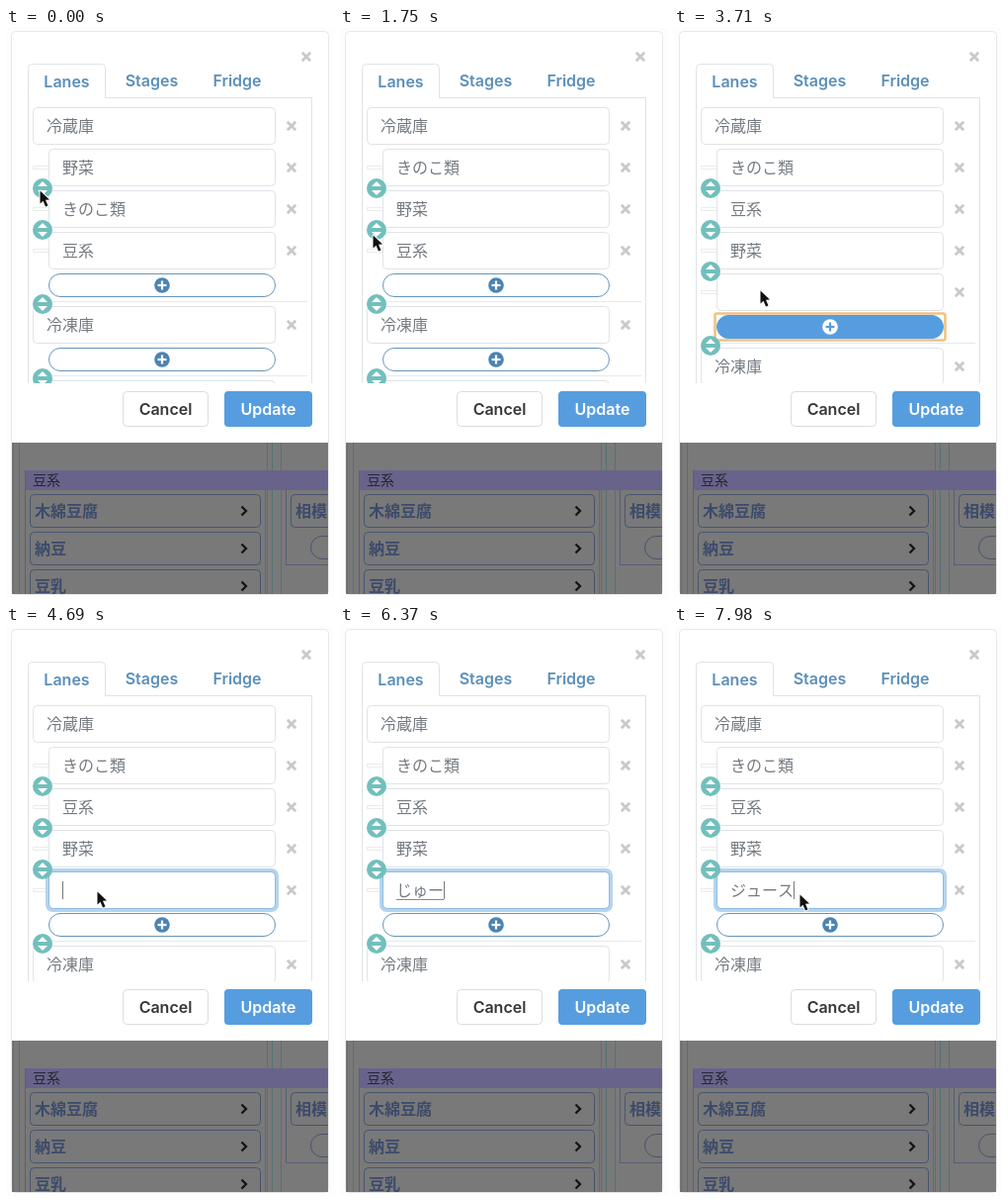
Write an HTML page with a canvas that moves like this. It is 332x576 px and loops after 8050 ms.

```html
<!DOCTYPE html>
<html lang="ja">
<head>
<meta charset="utf-8">
<title>Lane editor</title>
<style>
html, body { margin: 0; width: 100%; height: 100%; overflow: hidden; background: #fff; }
canvas { display: block; width: 332px; height: 576px; }
</style>
</head>
<body>
<canvas id="stage"></canvas>
<script>
const W = 332, H = 576, LOOP = 8050, STEP = 70;
const canvas = document.getElementById('stage');
const c = canvas.getContext('2d');
const ratio = window.devicePixelRatio || 1;
canvas.width = W * ratio;
canvas.height = H * ratio;

const JP = '"Noto Sans CJK JP", "Noto Sans CJK", sans-serif';
const UI = 'Inter, "Noto Sans", sans-serif';
const BLUE = '#569de0', LINK = '#5b8fb9', TEAL = '#72bfbd', RING = '#f1c283';
const BORDER = '#dfe3e7', GREY = '#747a80', NAVY = '#3c4a6a';

// Moments of the recorded actions
const SWAP1 = 840, SWAP2 = 2170, ADD = 3430, FOCUS = 4410, TYPED = 6720;
const typing = [
  [5880, 'j'], [6020, 'じ'], [6160, 'じゅ'], [6300, 'じゅー'],
  [6440, 'じゅーs'], [6510, 'じゅーす'], [TYPED, 'ジュース']
];
const path = [
  [0, 34, 164], [980, 34, 164], [1540, 33, 209], [2240, 33, 209], [2590, 63, 234],
  [3080, 87, 262], [3430, 87, 262], [3640, 87, 265], [3920, 87, 265],
  [4270, 92, 268], [7350, 92, 268], [7840, 127, 271], [LOOP, 127, 271]
];

function box(x, y, w, h, r, stroke, fill, line = 1) {
  c.beginPath();
  c.roundRect(x, y, w, h, r);
  if (fill) { c.fillStyle = fill; c.fill(); }
  if (stroke) { c.strokeStyle = stroke; c.lineWidth = line; c.stroke(); }
}

function poly(points, color, width, close) {
  c.beginPath();
  points.forEach(([x, y], i) => i ? c.lineTo(x, y) : c.moveTo(x, y));
  if (close) c.closePath();
  if (width) { c.strokeStyle = color; c.lineWidth = width; c.stroke(); }
  else { c.fillStyle = color; c.fill(); }
}

const line = (x1, y1, x2, y2, color, width = 1) => poly([[x1, y1], [x2, y2]], color, width);

function disc(x, y, r, color) {
  c.beginPath();
  c.arc(x, y, r, 0, Math.PI * 2);
  c.fillStyle = color;
  c.fill();
}

function text(s, x, y, color, font, align = 'left') {
  c.font = font;
  c.fillStyle = color;
  c.textAlign = align;
  c.fillText(s, x, y);
}

function cross(x, y) {
  line(x - 4.2, y - 4.2, x + 4.2, y + 4.2, '#c6cacd', 2.8);
  line(x - 4.2, y + 4.2, x + 4.2, y - 4.2, '#c6cacd', 2.8);
}

function swapButton(y, ring) {
  disc(37, y, 10, TEAL);
  poly([[32, y - 2], [42, y - 2], [37, y - 7]], '#fff', 0, true);
  poly([[32, y + 2], [42, y + 2], [37, y + 7]], '#fff', 0, true);
  if (ring) box(25.5, y - 11.5, 23, 23, 1, RING, null, 3);
}

function field(x, y, label, focused) {
  if (focused) {
    box(x - 1, y - 1, 275 - x, 40, 5, '#b5d4ee', '#fff', 4);
    box(x + .5, y + .5, 272 - x, 37, 4, '#8dbde6');
  } else {
    box(x + .5, y + .5, 272 - x, 37, 4, BORDER, '#fff');
  }
  text(label, x + 14, y + 25, GREY, '16px ' + JP);
  cross(289, y + 19);
}

function addButton(y, filled, ring) {
  box(43.5, y + .5, 229, 23, 11.5, filled ? BLUE : '#6794bb', filled ? BLUE : '#fff');
  const ink = filled ? '#fff' : '#4b84b3', plus = filled ? BLUE : '#fff';
  disc(158, y + 12, 7.8, ink);
  line(153.5, y + 12, 162.5, y + 12, plus, 2.2);
  line(158, y + 7.5, 158, y + 16.5, plus, 2.2);
  if (ring) box(41.5, y - 1.5, 233, 27, 2, RING, null, 2.6);
}

function card(x, y, w, label) {
  box(x + .5, y + .5, w, 33, 4, '#48546f');
  text(label, x + 5, y + 23, NAVY, 'bold 16px ' + JP);
}

function backdrop() {
  c.save();
  c.beginPath();
  c.rect(6, 419, 320, 153);
  c.clip();
  c.fillStyle = '#797979';
  c.fillRect(6, 419, 320, 153);
  for (const x of [7.5, 13.5, 264.5, 269.5, 278.5]) line(x, 419, x, 572, '#557275');
  line(19.5, 447, 19.5, 572, '#59617a');
  line(262.5, 467, 262.5, 572, '#626878');
  c.fillStyle = '#68638a';
  c.fillRect(20, 447, 244, 20);
  c.fillRect(264, 447, 62, 20);
  text('豆系', 27, 462, '#242530', '14px ' + JP);
  ['木綿豆腐', '納豆', '豆乳'].forEach((name, i) => {
    const y = 471 + i * 38;
    card(24, y, 233, name);
    poly([[238.5, y + 12.5], [243, y + 17], [238.5, y + 21.5]], '#151515', 2.3);
  });
  line(283.5, 467, 283.5, 542, '#555e76');
  line(283, 542.5, 326, 542.5, '#555e76');
  card(288, 471, 80, '相模');
  box(308.5, 513.5, 70, 23, 12, '#48546f');
  c.restore();
}

function frameAndTabs() {
  box(5.5, 3.5, 321, 569, 4, '#e8e8e8', '#fff');
  cross(304, 29);
  line(101, 70.5, 309, 70.5, BORDER);
  line(22.5, 70, 22.5, 359, BORDER);
  line(309.5, 70, 309.5, 359, BORDER);
  c.beginPath();
  c.moveTo(22.5, 71);
  c.arcTo(22.5, 36.5, 40, 36.5, 4);
  c.arcTo(100.5, 36.5, 100.5, 50, 4);
  c.lineTo(100.5, 71);
  c.strokeStyle = BORDER;
  c.lineWidth = 1;
  c.stroke();
  const font = '600 16px ' + UI;
  text('Lanes', 61.5, 60, LINK, font, 'center');
  text('Stages', 147.5, 59, LINK, font, 'center');
  text('Fridge', 234, 59, LINK, font, 'center');
}

function footer() {
  const font = '600 16px ' + UI;
  box(118.5, 367.5, 86, 35, 4, '#dcdcdc', '#fff');
  text('Cancel', 161.5, 391, '#363636', font, 'center');
  box(221, 367, 89, 36, 4, null, BLUE);
  text('Update', 265.5, 391, '#fff', font, 'center');
}

function lanes(t) {
  const names = t < SWAP1 ? ['野菜', 'きのこ類', '豆系']
    : t < SWAP2 ? ['きのこ類', '野菜', '豆系'] : ['きのこ類', '豆系', '野菜'];
  const entry = typing.reduce((s, [at, v]) => t >= at ? v : s, '');
  const added = t >= ADD, focused = t >= FOCUS;
  if (added) names.push(entry);
  const shift = added ? 42 : 0;

  c.save();
  c.beginPath();
  c.rect(20, 72, 288, 287);
  c.clip();
  field(27, 80, '冷蔵庫');
  names.forEach((name, i) => {
    const y = 122 + i * 42;
    box(27.5, y + 17.5, 16, 3, 0, '#e9ebed');
    field(43, y, name, focused && i === 3);
  });

  if (focused) {
    const last = typing.reduce((s, [at]) => t >= at ? at : s, FOCUS + 70);
    const x = 57 + (c.font = '16px ' + JP, c.measureText(entry).width);
    if (entry && t < TYPED) line(57, 276.5, x, 276.5, '#888');
    if ((t - last) % 1000 < 560) line(x + .5, 258, x + .5, 276, '#777');
  }

  const over = t >= 2940 && t < FOCUS - 210;
  const ring = t >= ADD - 140 && t < FOCUS;
  addButton(248 + shift, over, ring);
  line(27, 276.5 + shift, 305, 276.5 + shift, '#e6e8ea');
  field(27, 281 + shift, '冷凍庫');
  addButton(323 + shift);
  line(27, 351.5 + shift, 305, 351.5 + shift, '#e6e8ea');
  field(27, 356 + shift, '');

  const firstRing = (t >= SWAP1 - 140 && t < SWAP1) || (t >= SWAP2 && t < ADD - 140);
  swapButton(162, firstRing);
  swapButton(204, t >= SWAP2 - 140 && t < SWAP2);
  if (added) swapButton(246);
  swapButton(279 + shift);
  swapButton(354 + shift);
  c.restore();
}

function pointer(t) {
  if (t >= 5040 && t < 7350) return;
  const i = path.findIndex(p => p[0] > t);
  const [t0, x0, y0] = path[i - 1], [t1, x1, y1] = path[i];
  const u = (t - t0) / (t1 - t0), e = u * u * (3 - 2 * u);
  c.save();
  c.translate(x0 + (x1 - x0) * e, y0 + (y1 - y0) * e);
  const arrow = [[.5, .5], [.5, 13.5], [3.5, 10.8], [6, 16.5], [8.5, 15.4], [6, 9.8], [10, 9.6]];
  c.lineJoin = 'round';
  poly(arrow, '#fff', 2, true);
  poly(arrow, '#111', 0, true);
  c.restore();
}

function draw(now) {
  const t = Math.floor((now % LOOP) / STEP) * STEP;
  c.setTransform(ratio, 0, 0, ratio, 0, 0);
  c.fillStyle = '#fdfdfd';
  c.fillRect(0, 0, W, H);
  frameAndTabs();
  backdrop();
  lanes(t);
  footer();
  pointer(t);
}

let start;
function tick(now) {
  start ??= now;
  draw(Math.max(0, now - start));
  requestAnimationFrame(tick);
}
draw(0);
requestAnimationFrame(tick);
</script>
</body>
</html>
```
